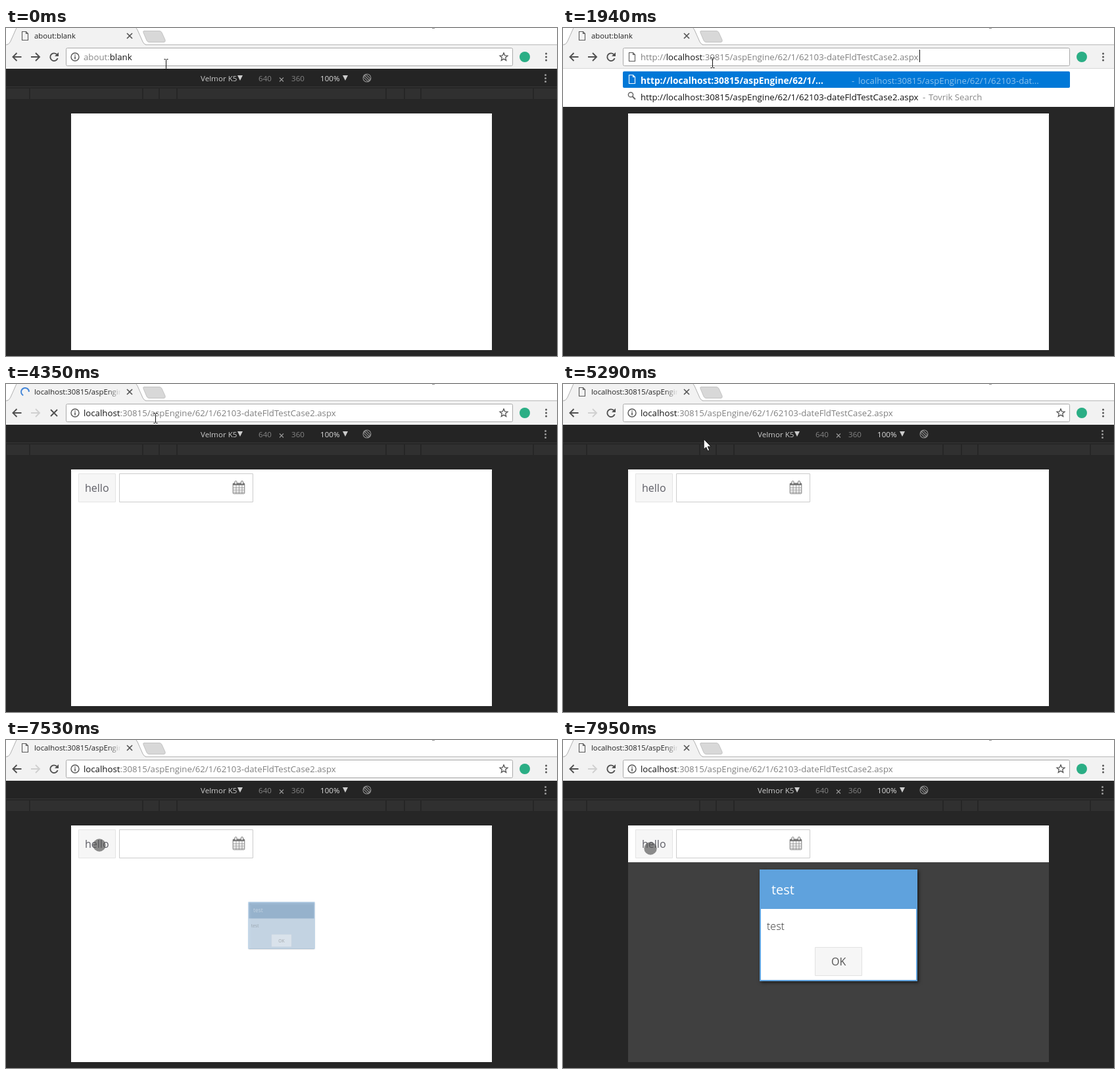
An HTML page with a canvas for the animation above (7990 ms loop, 838x499 px).

```html
<!DOCTYPE html>
<html lang="en">
<head>
<meta charset="utf-8">
<title>Date field test</title>
<style>
html, body { margin: 0; width: 100%; height: 100%; overflow: hidden; }
canvas { display: block; }
</style>
</head>
<body>
<canvas id="stage" width="838" height="499"></canvas>
<script>
const ctx = document.getElementById('stage').getContext('2d');
const LOOP = 7990;
const HOST = 'localhost';
const PATH = ':30815/aspEngine/62/1/62103-dateFldTestCase2.aspx';
const URL_SIZE = 13.23;
const BLUE = '#5fa2dd';

const clamp = v => Math.max(0, Math.min(1, v));
const progress = (t, from, to) => clamp((t - from) / (to - from));
const mix = (a, b, k) => a + (b - a) * k;
const smooth = k => k * k * (3 - 2 * k);

function rect(x, y, w, h, fill, stroke, radius = 0) {
  ctx.beginPath();
  ctx.roundRect(stroke ? x + .5 : x, stroke ? y + .5 : y, stroke ? w - 1 : w, stroke ? h - 1 : h, radius);
  paint(fill, stroke);
}

function paint(fill, stroke, width = 1) {
  if (fill) { ctx.fillStyle = fill; ctx.fill(); }
  if (stroke) { ctx.strokeStyle = stroke; ctx.lineWidth = width; ctx.stroke(); }
}

function circle(x, y, r, fill, stroke, width) {
  ctx.beginPath();
  ctx.arc(x, y, r, 0, 7);
  paint(fill, stroke, width);
}

function path(d, x, y, fill, stroke, width = 1) {
  ctx.save();
  ctx.translate(x, y);
  const shape = new Path2D(d);
  if (fill) { ctx.fillStyle = fill; ctx.fill(shape); }
  if (stroke) { ctx.strokeStyle = stroke; ctx.lineWidth = width; ctx.stroke(shape); }
  ctx.restore();
}

// Returns the x position at the end of the text.
function text(str, x, y, size, color, weight = 400) {
  ctx.font = `${weight} ${size}px "Open Sans", sans-serif`;
  ctx.fillStyle = color;
  ctx.fillText(str, x, y);
  return x + ctx.measureText(str).width;
}

const page = (x, y, color) => path('M.5 .5H6.5L9.5 3.5V13.5H.5ZM6.5 .5V3.5H9.5', x, y, null, color, 1.1);
const dots = (x, y, r, gap, color) => [-gap, 0, gap].forEach(d => circle(x, y + d, r, color));

function spinner(t, committed) {
  const a = t / 160 * (committed ? 1 : -.6);
  ctx.beginPath();
  ctx.arc(29, 12, 6, a, a + (committed ? 4.2 : 2.6));
  paint(null, committed ? '#4285d8' : '#8c8c8c', 2);
}

function tabStrip(t, loading, committed) {
  rect(0, 0, 838, 26, '#fff');
  rect(648, 0, 4, 1, '#999');
  rect(0, 25, 838, 37, '#f2f2f2');
  rect(0, 25, 838, 1, '#b8b8b8');
  path('M1 26Q5 25 7 20L15 2Q16 0 18 0H197Q199 0 200 3L208 21Q210 25 213 26Z', 0, 0, '#f2f2f2');
  path('M1 25.5Q5 25 7 20L15 2L16 0M198 0L200 3L208 21Q210 25 213 25.5', 0, 0, null, '#b0b0b0');
  path('M210 4.5H233Q236 4.5 237 7L242 18Q243 21.5 240 21.5H218Q215 21.5 214 19L209 7Q208 4.5 210 4.5Z', 0, 0, '#d8d8d8', '#c3c3c3');

  if (loading) spinner(t, committed);
  else page(24, 5, '#5a5a5a');
  ctx.save();
  ctx.beginPath();
  ctx.rect(40, 3, 135, 20);
  ctx.clip();
  text(committed ? HOST + PATH : 'about:blank', 43, 16, 11.3, '#222');
  const fade = ctx.createLinearGradient(155, 0, 175, 0);
  fade.addColorStop(0, '#f2f2f200');
  fade.addColorStop(1, '#f2f2f2');
  rect(155, 3, 20, 20, fade);
  ctx.restore();
  path('M-4 -4L4 4M4 -4L-4 4', 188, 12, null, '#555', 1.7);
}

function toolbar(t, loading, committed) {
  const arrow = 'M7 0H-6M0 -6L-6 0L0 6';
  path(arrow, 16.5, 44, null, '#505050', 1.9);
  ctx.save();
  ctx.translate(45, 44);
  ctx.scale(-1, 1);
  path(arrow, 0, 0, null, committed ? '#d0d0d0' : '#505050', 1.9);
  ctx.restore();
  if (loading) path('M-5 -5L5 5M5 -5L-5 5', 73, 44, null, '#505050', 1.9);
  else {
    path('M4.6 -3.5A5.8 5.8 0 1 0 5.6 2', 73, 44, null, '#505050', 1.9);
    path('M7 -7V-1H1Z', 73, 44, '#505050');
  }

  rect(91, 30, 680, 28, '#fff', '#a9a9a9', 2);
  const typed = t >= 1940 && !committed;
  if (typed) page(100, 37, '#5a5a5a');
  else {
    circle(105, 44, 6, null, '#555', 1.4);
    rect(104.2, 43, 1.6, 4.5, '#555');
    rect(104.2, 40.5, 1.6, 1.6, '#555');
    path('M0 -6.2L1.7 -2.2L6 -1.8L2.7 1.1L3.7 5.3L0 3.1L-3.7 5.3L-2.7 1.1L-6 -1.8L-1.7 -2.2Z', 757, 44, null, '#555', 1.3);
  }
  circle(789, 44, 8, '#2bae85');
  dots(821.5, 44, 1.5, 5, '#555');

  const selected = t >= 640 && t < 1940;
  if (selected) rect(118, 33, 74, 19, '#0078d7');
  let x = 118;
  if (t < 1940) {
    x = text('about:', x, 49, URL_SIZE, selected ? '#fff' : '#888');
    text('blank', x, 49, URL_SIZE, selected ? '#fff' : '#111');
  } else {
    if (typed) x = text('http://', x, 49, URL_SIZE, '#808080');
    x = text(HOST, x, 49, URL_SIZE, '#111');
    text(PATH, x, 49, URL_SIZE, '#808080');
  }
  if (t >= 580 && t < 640) rect(191, 33, 1, 19, '#111');
  if (t >= 1940 && t < 2450 || t >= 2970 && t < 3490) rect(542, 33, 1, 19, '#111');
}

function deviceBar() {
  rect(0, 62, 838, 437, '#262626');
  rect(0, 63, 838, 26, '#242424');
  rect(0, 89, 838, 1, '#363636');
  const edges = [0, 36, 208, 233, 260, 578, 606, 631, 802, 839];
  edges.slice(1).forEach((end, i) => rect(edges[i] + 1, 92, end - edges[i] - 2, 16, '#303030'));
  text('Velmor K5', 296, 81, 11.6, '#ccc');
  text('640', 384, 81, 11.6, '#858585');
  text('360', 434, 81, 11.6, '#858585');
  text('100%', 478, 81, 11.6, '#ddd');
  path('M-3 -3L3 3M3 -3L-3 3', 419, 78.5, null, '#999', 1.1);
  [356, 516].forEach(x => path('M-4 -4H4L0 4Z', x, 76, '#ccc'));
  circle(549, 76, 6, null, '#8a8a8a', 1.1);
  path('M-5.5 -1.5L-1.5 -5.5L5.5 1.5L1.5 5.5ZM-4.5 -4.5L4.5 4.5', 549, 76, null, '#8a8a8a', 1.1);
  dots(820.5, 76.5, 1.5, 5, '#999');
}

function suggestions() {
  rect(0, 61, 838, 59, '#fff');
  rect(0, 61, 838, 1, '#d8d8d8');
  rect(91, 66, 680, 25, '#0078d7', null, 2);
  page(100, 71, '#fff');
  text('http://' + HOST + PATH.slice(0, 22) + '...', 118, 85, 13.72, '#fff', 700);
  text('-', 439, 85, URL_SIZE, '#8cc2ee');
  text(HOST + PATH.slice(0, 31) + '...', 449, 85, URL_SIZE, '#8cc2ee');
  circle(103, 101.5, 3.6, null, '#666', 1.5);
  path('M0 0L4.5 4.5', 105.5, 104, null, '#666', 1.9);
  text('http://' + HOST + PATH, 118, 110, URL_SIZE, '#111');
  text('-', 547, 110, URL_SIZE, '#888');
  text('Tovrik Search', 556, 110, URL_SIZE, '#888');
}

function calendar(x, y) {
  rect(x + .7, y + 3.5, 18.6, 16.8, null, '#777', 1);
  rect(x + 1, y + 4, 18, 3, '#777');
  for (let i = 1; i < 4; i++) {
    rect(x + 1 + i * 4.5, y + 7, 1, 13, '#999');
    rect(x + 1, y + 7 + i * 3.4, 18, 1, '#999');
  }
  [3.5, 13].forEach(d => rect(x + d, y, 4, 6, '#fff', '#777', 2));
}

function form(t) {
  const pressed = t >= 7270 && t < 7400;
  rect(110, 136, 57, 44, pressed ? '#ebebeb' : '#f6f6f6', '#e4e4e4');
  text('hello', 120, 164, 16, '#5e5e66');
  rect(172, 136, 204, 44, '#fff', '#ccc');
  calendar(344, 147);
}

function dialog(t) {
  const k = progress(t, 7415, 7690);
  if (!k) return;
  if (t >= 7700) rect(99, 186, 640, 304, '#404040');
  ctx.save();
  ctx.globalAlpha = k;
  ctx.translate(419, 282);
  ctx.scale(k, k);
  ctx.translate(-120, -85);
  ctx.shadowColor = 'rgba(0,0,0,.6)';
  ctx.shadowBlur = 5 * k;
  ctx.shadowOffsetX = ctx.shadowOffsetY = 2 * k;
  rect(0, 0, 240, 170, BLUE);
  ctx.shadowColor = 'transparent';
  rect(2, 60, 236, 108, '#fff');
  text('test', 18, 38, 20, '#fff');
  text('test', 11, 92, 16, '#333', 300);
  rect(84, 118, 72, 44, '#f6f6f6', '#e2e2e2');
  text('OK', 109, 146, 16, '#555');
  ctx.restore();
}

function pointerAt(t) {
  if (t >= 7950) return [133, 165];
  if (t >= 5260) {
    const k = progress(t, 5260, 6000);
    return [mix(214, 142, smooth(k)), mix(80, 160, k)];
  }
  if (t >= 4890) {
    const k = progress(t, 4890, 5050);
    return [mix(227.5, 214, k), mix(52, 80, k)];
  }
  const k = smooth(progress(t, 40, 340));
  return [Math.round(mix(243, 227, k)) + .5, t < 2620 ? Math.round(mix(55, 53, k)) : 52];
}

function pointer(t) {
  const [x, y] = pointerAt(t);
  if (y >= 130) circle(x, y, 9.7, 'rgba(80,80,80,.65)');
  else if (y > 58) path('M.5 .5V16L4 12.8L6.5 18.4L9 17.3L6.6 11.8H11.5Z', x, y, '#fff', '#111');
  else path('M-3 -7.5H-1L0 -6.5L1 -7.5H3M0 -6.5V6.5M-3 7.5H-1L0 6.5L1 7.5H3', x, y, null, '#111');
}

function draw(t) {
  const loading = t >= 3620 && t < 4370;
  const committed = t >= 4250;
  tabStrip(t, loading, committed);
  toolbar(t, loading, committed);
  deviceBar();
  rect(99, 130, 640, 360, '#fff');
  if (t >= 1940 && t < 3590) suggestions();
  if (t >= 4310) form(t);
  dialog(t);
  pointer(t);
}

function tick() {
  draw(performance.now() % LOOP);
  requestAnimationFrame(tick);
}
tick();
</script>
</body>
</html>
```
